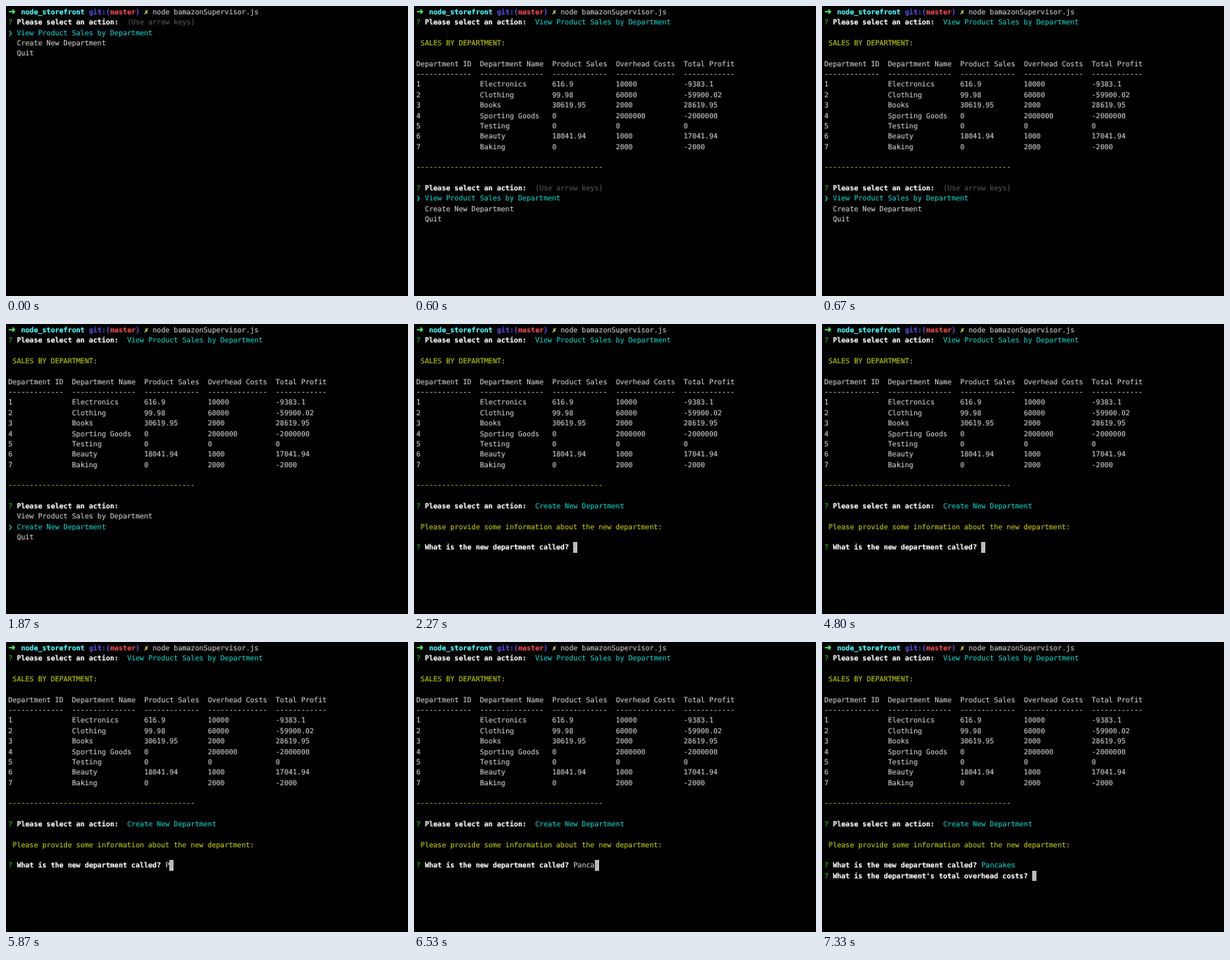
Write an HTML page that moves like this. It is 480 px wide and 346 px high and loops after 8000 ms.

```html
<!DOCTYPE html>
<html lang="en">
<head>
<meta charset="utf-8">
<title>Terminal session</title>
<style>
  html, body { margin: 0; width: 100%; height: 100%; overflow: hidden; background: #000; }
  #screen {
    position: relative; width: 480px; height: 346px; overflow: hidden; background: #000;
    font: 8.417px/12.36px "DejaVu Sans Mono", monospace;
    color: #c8c8c8; text-rendering: geometricPrecision; font-kerning: none;
    -webkit-text-stroke: 0.12px;
  }
  #screen span { position: absolute; white-space: pre; }
  .bold { font-weight: bold; color: #fff; }
  #screen .arrow { font: bold 10.5px/12.36px "DejaVu Sans", sans-serif; color: #5f5; }
  .dir { font-weight: bold; color: #5ff; }
  .git { font-weight: bold; color: #5a52dc; }
  .branch { font-weight: bold; color: #ec4c52; }
  .dirty { font-weight: bold; color: #ff5; }
  .green { color: #1cc41c; }
  .cyan { color: #14c8be; }
  .yellow { color: #bcc414; }
  .hint { color: #555; }
  .cursor { width: 5.067px; height: 12.36px; background: #bbb; }
</style>
</head>
<body>
<div id="screen"></div>
<script>
const LOOP = 8000;
const LEFT = 2.8, TOP = 0.9, CELL_W = 5.067, CELL_H = 12.36;
const screen = document.getElementById('screen');

const ACTIONS = ['View Product Sales by Department', 'Create New Department', 'Quit'];
const COLUMNS = [0, 15, 32, 47, 63];
const TABLE = [
  ['Department ID', 'Department Name', 'Product Sales', 'Overhead Costs', 'Total Profit'],
  [13, 15, 13, 14, 12].map(n => '-'.repeat(n)),
  ['1', 'Electronics', '616.9', '10000', '-9383.1'],
  ['2', 'Clothing', '99.98', '60000', '-59900.02'],
  ['3', 'Books', '30619.95', '2000', '28619.95'],
  ['4', 'Sporting Goods', '0', '2000000', '-2000000'],
  ['5', 'Testing', '0', '0', '0'],
  ['6', 'Beauty', '18041.94', '1000', '17041.94'],
  ['7', 'Baking', '0', '2000', '-2000']
];

function put(row, col, text, style = '') {
  const span = document.createElement('span');
  span.className = style;
  span.textContent = text;
  span.style.left = LEFT + col * CELL_W + 'px';
  span.style.top = TOP + row * CELL_H + 'px';
  screen.append(span);
}

function question(row, text) {
  put(row, 0, '?', 'green');
  put(row, 2, text, 'bold');
}

function actionPrompt(row, answer, style) {
  question(row, 'Please select an action:');
  put(row, 28, answer, style);
}

function menu(row, selected, hint) {
  actionPrompt(row, hint ? '(Use arrow keys)' : '', 'hint');
  ACTIONS.forEach((label, i) => {
    const active = i === selected;
    if (active) put(row + 1 + i, 0, '❯', 'cyan');
    put(row + 1 + i, 2, label, active ? 'cyan' : '');
  });
}

function shellLine() {
  put(0, 0, '➜', 'arrow');
  put(0, 3, 'node_storefront', 'dir');
  put(0, 19, 'git:(', 'git');
  put(0, 24, 'master', 'branch');
  put(0, 30, ')', 'git');
  put(0, 32, '✗', 'dirty');
  put(0, 34, 'node bamazonSupervisor.js');
}

function report() {
  actionPrompt(1, ACTIONS[0], 'cyan');
  put(3, 1, 'SALES BY DEPARTMENT:', 'yellow');
  TABLE.forEach((cells, r) => cells.forEach((cell, c) => put(5 + r, COLUMNS[c], cell)));
  put(15, 0, '-'.repeat(44), 'yellow');
}

function form(name, done) {
  report();
  actionPrompt(17, ACTIONS[1], 'cyan');
  put(19, 1, 'Please provide some information about the new department:', 'yellow');
  question(21, 'What is the new department called?');
  put(21, 37, name, done ? 'cyan' : '');
  if (done) {
    question(22, "What is the department's total overhead costs?");
    put(22, 49, '', 'cursor');
  } else {
    put(21, 37 + name.length, '', 'cursor');
  }
}

const typed = (time, name) => [time, () => form(name, false)];

const STEPS = [
  [0, () => menu(1, 0, true)],
  [600, () => { report(); menu(17, 0, true); }],
  [1870, () => { report(); menu(17, 1, false); }],
  typed(2270, ''),
  typed(5270, 'P'),
  typed(5600, ''),
  typed(5870, 'P'),
  typed(5930, 'Pa'),
  typed(6070, 'Pan'),
  typed(6400, 'Panc'),
  typed(6530, 'Panca'),
  typed(6670, 'Pancake'),
  typed(6730, 'Pancakes'),
  [7330, () => form('Pancakes', true)]
];

let shown = null;

function tick() {
  const time = performance.now() % LOOP;
  const step = STEPS.findLast(([start]) => start <= time);
  if (step !== shown) {
    shown = step;
    screen.replaceChildren();
    shellLine();
    step[1]();
  }
  requestAnimationFrame(tick);
}
tick();
</script>
</body>
</html>
```
